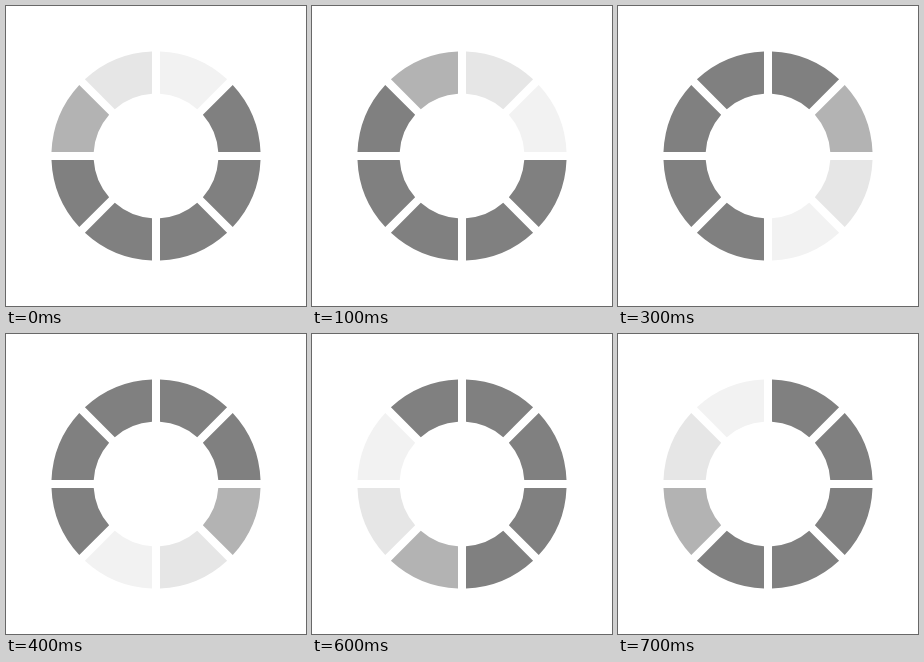
An HTML page that plays this animation: 300x300 px, repeating every 0.8 s.

```html
<!DOCTYPE html>
<html lang="en">
<head>
<meta charset="utf-8">
<title>Loading ring</title>
<style>
  html, body { margin: 0; width: 100%; height: 100%; overflow: hidden; background: #fff; }
  svg { display: block; width: 100%; height: 100%; }
</style>
</head>
<body>
<svg viewBox="0 0 300 300"><g id="ring" transform="translate(150 150)"></g></svg>
<script>
  const COUNT = 8, STEP = 100, OUTER = 104.6, INNER = 62.4, HALF_GAP = 4;
  const TAIL = ['#f2f2f2', '#e6e6e6', '#b3b3b3'], BASE = '#808080';
  const ring = document.getElementById('ring');

  // Point at radius r, inset from the segment edge so the gaps keep parallel sides.
  function point(r, edge, side) {
    const a = edge * 2 * Math.PI / COUNT + side * Math.asin(HALF_GAP / r);
    return (r * Math.sin(a)).toFixed(3) + ' ' + (-r * Math.cos(a)).toFixed(3);
  }

  function segment(i) {
    const path = document.createElementNS('http://www.w3.org/2000/svg', 'path');
    path.setAttribute('d',
      `M${point(OUTER, i, 1)}A${OUTER} ${OUTER} 0 0 1 ${point(OUTER, i + 1, -1)}` +
      `L${point(INNER, i + 1, -1)}A${INNER} ${INNER} 0 0 0 ${point(INNER, i, 1)}Z`);
    return ring.appendChild(path);
  }

  const segments = Array.from({ length: COUNT }, (_, i) => segment(i));

  function draw(now) {
    const head = Math.floor(now / STEP) % COUNT;
    segments.forEach((s, i) => {
      s.setAttribute('fill', TAIL[(head - i + COUNT) % COUNT] || BASE);
    });
  }

  const start = performance.now();
  function tick() {
    draw(performance.now() - start);
    requestAnimationFrame(tick);
  }
  draw(0);
  requestAnimationFrame(tick);
</script>
</body>
</html>
```
